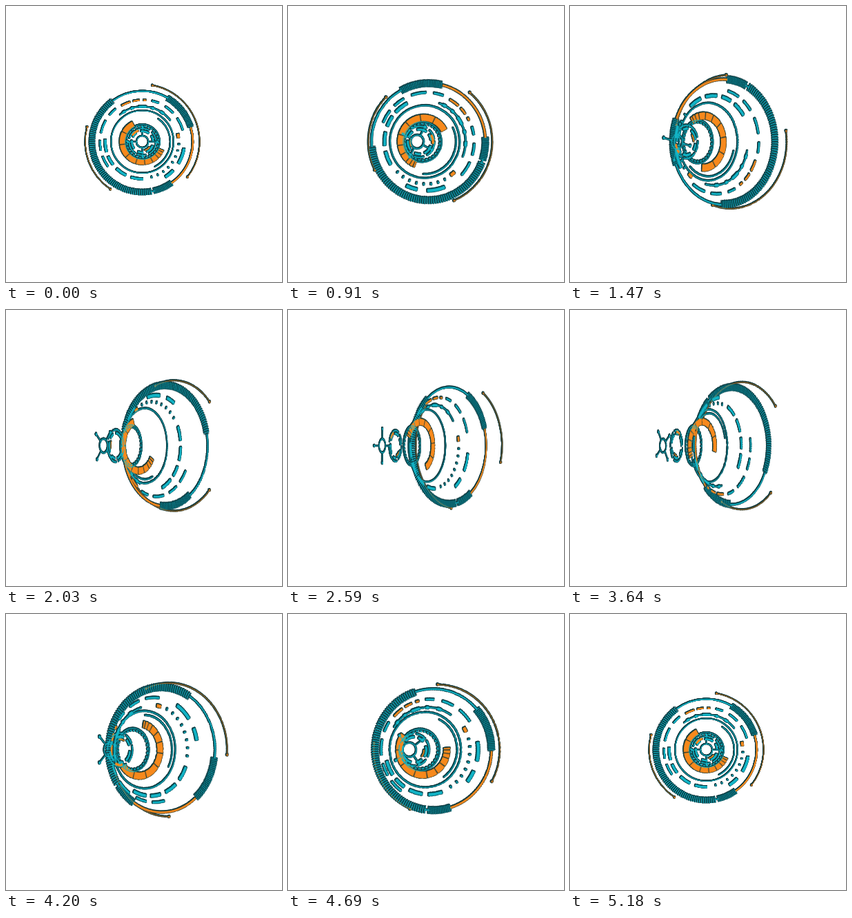
Write an HTML page without scripts that moves like this. It is 400x400 px and loops after 5.25 s.

```html
<!DOCTYPE html>
<html lang="en">
<head>
<meta charset="utf-8">
<title>Ring interface</title>
<style>
  @property --p { syntax: "<number>"; inherits: true; initial-value: 0; }
  @property --g { syntax: "<number>"; inherits: true; initial-value: 0; }
  @property --z { syntax: "<number>"; inherits: true; initial-value: 0; }

  html, body { margin: 0; width: 100%; height: 100%; overflow: hidden; background: #fff; }

  svg {
    display: block;
    width: 100vw;
    height: 100vh;
    --ink: #08343a;
    filter: drop-shadow(.55px 0 var(--ink)) drop-shadow(-.55px 0 var(--ink))
            drop-shadow(0 .55px var(--ink)) drop-shadow(0 -.55px var(--ink));
    animation: tilt 5250ms linear infinite;
  }

  /* --p spread along the axis, --g tilt, --z zoom */
  @keyframes tilt {
    0%, 8% { --p: 0; --g: 0; --z: 0; }
    17.33% { --p: .17; --g: .08; --z: .16; }
    28% { --p: .7; --g: .5; --z: .24; }
    38.67% { --p: .92; --g: .83; --z: .2; }
    49.33% { --p: 1; --g: 1; --z: .155; }
    69.33% { --p: 1.03; --g: 1.02; --z: .16; }
    80% { --p: .78; --g: .42; --z: .24; }
    89.5% { --p: .35; --g: .1; --z: .2; }
    97.3% { --p: .05; --g: .01; --z: .03; }
    98.67%, 100% { --p: 0; --g: 0; --z: 0; }
  }

  /* --x shift, --q squash, --k zoom share */
  .ring {
    --s: calc(1 + var(--z) * var(--k, 1));
    transform: translateX(calc(var(--p) * var(--x) * 1px))
               scale(calc(var(--s) * (1 - var(--g) * var(--q))), var(--s));
  }

  .spin { animation: spin 5250ms infinite; }
  @keyframes spin {
    0% { transform: rotate(0deg); animation-timing-function: cubic-bezier(.3333, 0, .6667, 1); }
    98.67%, 100% { transform: rotate(var(--r)); }
  }

  circle, path { fill: none; stroke: #12b4c6; }
  .o { stroke: #f7891c; }
  .b { stroke: #c8741f; }
  .dot { fill: #12b4c6; stroke: none; }
  .b.dot { fill: #c8741f; }
</style>
</head>
<body>
<svg viewBox="0 0 400 400">
  <g transform="translate(198 197)">

    <g class="ring" style="--x:50;--q:.32;--k:.7"><g class="spin" style="--r:360deg">
      <g stroke-width=".9">
        <circle class="b" r="83" pathLength="360" stroke-dasharray="118 360" transform="rotate(-80)"/>
        <circle class="b" r="83" pathLength="360" stroke-dasharray="71 360" transform="rotate(124)"/>
      </g>
      <circle class="b dot" cx="83" r="1.5" transform="rotate(-80)"/>
      <circle class="b dot" cx="83" r="1.5" transform="rotate(38)"/>
      <circle class="b dot" cx="83" r="1.5" transform="rotate(124)"/>
      <circle class="b dot" cx="83" r="1.5" transform="rotate(195)"/>
    </g></g>

    <g class="ring" style="--x:36;--q:.365"><g class="spin" style="--r:-720deg">
      <circle r="73.5" stroke-width="1.8" pathLength="360" stroke-dasharray="66 360" transform="rotate(234)"/>
      <circle r="73" stroke-width="1.4" pathLength="360" stroke-dasharray="5 360" transform="rotate(76)"/>
      <circle class="o" r="73" stroke-width="2.4" pathLength="360" stroke-dasharray="72 360" transform="rotate(-17)"/>
      <g stroke-width="8.6">
        <path d="M36.5-63.2A73 73 0 0 1 69.8-21.3" stroke-dasharray=".8 1.3"/>
        <path d="M41.9 59.8A73 73 0 0 1 16.4 71.1" stroke-dasharray=".8 1.3"/>
        <path d="M12.7 71.9A73 73 0 0 1-42.9-59.1" stroke-dasharray="1.1 1.7"/>
      </g>
    </g></g>

    <g class="ring" style="--x:22;--q:.41"><g class="spin" style="--r:720deg">
      <g stroke-width="2.4">
        <circle class="o" r="60.5" pathLength="360" stroke-dasharray="13 4 9 5 4 360" transform="rotate(-120)"/>
        <circle r="61" pathLength="360" stroke-dasharray="10 10 14 9 18 360" transform="rotate(-77)"/>
        <circle r="61.5" pathLength="360" stroke-dasharray="16 8 14 10 18 9 12 360" transform="rotate(144)"/>
      </g>
      <circle r="61" stroke-width="4" pathLength="360" stroke-dasharray="22 12 14 360" transform="rotate(9)"/>
    </g></g>

    <g class="ring" style="--x:15;--q:.43"><g class="spin" style="--r:720deg">
      <circle class="o" r="52.5" stroke-width="4" pathLength="360" stroke-dasharray="7 360" transform="rotate(-13)"/>
      <circle r="53" stroke-width="3" pathLength="360" stroke-dasharray="1.8 8.4 1.8 8.4 1.8 8.4 1.8 8.4 1.8 8.4 1.8 8.4 1.8 8.4 1.8 360" transform="rotate(3)"/>
      <circle r="54" stroke-width="3.6" pathLength="360" stroke-dasharray="19 8 18 8 15 7 20 360" transform="rotate(89)"/>
      <circle r="51" stroke-width="1.4" pathLength="360" stroke-dasharray="93 360" transform="rotate(230)"/>
      <circle r="51" stroke-width="3.4" pathLength="360" stroke-dasharray="5 10 4 9 12 9 4 12 6 360" transform="rotate(236)"/>
    </g></g>

    <g class="ring" style="--x:4;--q:.49"><g class="spin" style="--r:360deg">
      <circle r="45.3" stroke-width="1.1"/>
      <circle r="40.5" stroke-width="1.1" pathLength="360" stroke-dasharray="120 360" transform="rotate(-56)"/>
    </g></g>

    <g class="ring" style="--x:-6;--q:.47;--k:1.2"><g class="spin" style="--r:1080deg">
      <circle class="o" r="29.3" stroke-width="8" pathLength="360"
        stroke-dasharray="4 2 6 2 8 2 16 2 19 2 22 2 28 2 33 2 32 2 35 360" transform="rotate(22)"/>
    </g></g>

    <g class="ring" style="--x:-18;--q:.58"><g class="spin" style="--r:-720deg">
      <circle r="25.3" stroke-width="1"/>
      <circle r="22.8" stroke-width="1.8" pathLength="360" stroke-dasharray="7 5"/>
    </g></g>

    <g class="ring" style="--x:-42;--q:.6"><g class="spin" style="--r:1440deg">
      <circle r="19.5" stroke-width="1.6" pathLength="360" stroke-dasharray="62 12 40 6"/>
      <circle r="15.5" stroke-width="2.6" pathLength="360" stroke-dasharray="48 18 30 24" transform="rotate(20)"/>
      <circle class="o" r="17.5" stroke-width="3.2" pathLength="360" stroke-dasharray="38 360" transform="rotate(212)"/>
      <circle class="o" r="12.5" stroke-width="1.6" pathLength="360" stroke-dasharray="42 360" transform="rotate(35)"/>
    </g></g>

    <g class="ring" style="--x:-61;--q:.53"><g class="spin" style="--r:1440deg">
      <circle r="8.6" stroke-width="1.2"/>
      <path d="M9 0H21M-9 0H-21M0 9V21M0-9V-21" stroke-width="1"/>
      <circle class="dot" cx="21.5" r="1.7"/>
      <circle class="dot" cx="-21.5" r="1.7"/>
      <circle class="dot" cy="21.5" r="1.7"/>
      <circle class="dot" cy="-21.5" r="1.7"/>
    </g></g>

  </g>
</svg>
</body>
</html>
```
